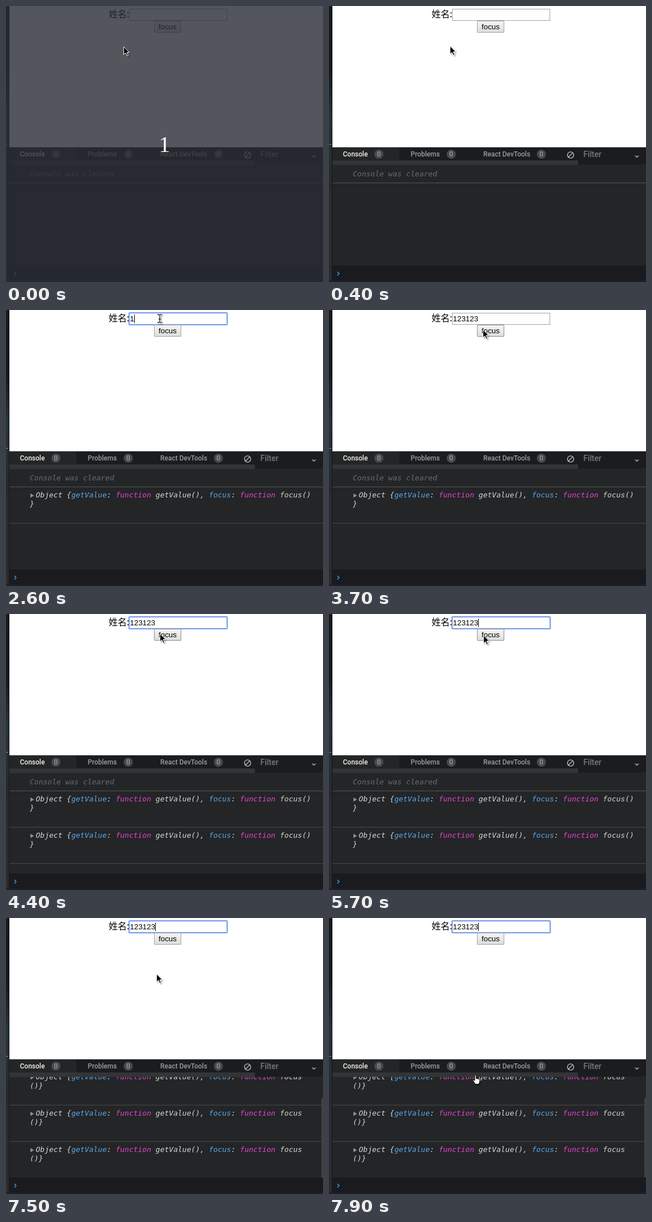
An HTML page for the animation above (8 s loop, 559 px wide and 486 px high).

```html
<!DOCTYPE html>
<html lang="zh">
<head>
<meta charset="utf-8">
<title>Focus demo</title>
<style>
  html, body { margin: 0; width: 100%; height: 100%; overflow: hidden; background: #242526; }
  svg { display: block; width: 559px; height: 486px; }
  .label { font: 16px "Noto Sans CJK SC", "Noto Sans CJK JP", "Noto Sans CJK", sans-serif; }
  .form { font: 13.333px "Liberation Sans", Arial, sans-serif; }
  .tab { font: 500 12px Roboto, sans-serif; fill: #9b9c9e; }
  .filter { font: 500 14px Roboto, sans-serif; fill: #77787a; }
  .log { font: italic 13px "DejaVu Sans Mono", monospace; fill: #d6d6d6; white-space: pre; }
  .key { fill: #56a8ee; }
  .word { fill: #e445d3; }
  .count { font: 40px "Liberation Serif", serif; fill: #fff; }
  .crisp { shape-rendering: crispEdges; }
</style>
</head>
<body>
<svg viewBox="0 0 559 486">
  <defs>
    <linearGradient id="face" x2="0" y2="1">
      <stop stop-color="#f5f5f5"/><stop offset="1" stop-color="#dcdcdc"/>
    </linearGradient>
    <linearGradient id="edge" x2="0" y2="1">
      <stop stop-color="#171a1d"/><stop offset=".35" stop-color="#15191c"/>
      <stop offset=".6" stop-color="#263338"/><stop offset="1" stop-color="#24292d"/>
    </linearGradient>
    <filter id="shadow" x="-50%" y="-50%" width="220%" height="220%">
      <feDropShadow dx="1.5" dy="1.5" stdDeviation="1" flood-opacity=".4"/>
    </filter>
    <clipPath id="view"><path d="M6 280H559V457H6z"/></clipPath>
  </defs>

  <g class="crisp">
    <path fill="#242526" d="M0 0H559V486H0z"/>
    <path fill="url(#edge)" d="M0 0H5V323H0z"/>
    <path fill="#2a2b2e" d="M0 323H5V486H0z"/>
    <path fill="#14161a" d="M5 0H6V486H5z"/>
    <path fill="#8b9698" d="M0 243H4V244H0z"/>
    <path fill="#fff" d="M6 0H559V248H6z"/>
    <path fill="#c8c8c8" d="M6 248H559V249H6z"/>
    <path fill="#1b1c20" d="M6 249H559V279H6z"/>
    <path fill="#242526" d="M6 249H124V273H6z"/>
    <path fill="#333436" d="M6 272H439V280H6z"/>
  </g>

  <text class="label" x="181" y="20">姓名:</text>
  <rect class="crisp" x="217.5" y="5.5" width="172" height="20" fill="#fff" stroke="#a3a3a3"/>
  <rect id="ring" x="217" y="5" width="173" height="21" rx="1" fill="none" stroke="#7299e8" stroke-width="2"/>
  <text id="value" class="form" x="218.6" y="20"></text>
  <path id="caret" class="crisp" fill="#000" d="M0 8h1v15h-1z"/>
  <rect id="button" x="261.5" y="26.5" width="47" height="20" rx=".5" fill="url(#face)"/>
  <text class="form" x="285" y="41" text-anchor="middle">focus</text>

  <g id="tabs"></g>
  <g fill="none" stroke="#c4c5c6" stroke-width="1.3">
    <circle cx="426" cy="262.3" r="5.5"/>
    <path d="M422 266.3l8-8"/>
    <path d="M540 263.5l3 2.7 3-2.7"/>
  </g>
  <text class="filter" x="448.5" y="266">Filter</text>

  <g clip-path="url(#view)">
    <g id="log">
      <text class="log" x="42" y="300" style="fill:#6b6c6e">Console was cleared</text>
      <path class="crisp" fill="#535456" d="M6 311H559V312H6z"/>
      <g id="rows"></g>
    </g>
    <path id="thumb" class="crisp" fill="#404143" d="M556 317H559V457H556z"/>
  </g>
  <path class="crisp" fill="#1a1b1f" d="M6 457H559V486H6z"/>
  <path class="crisp" fill="#1e1f28" d="M0 483H559V486H0z"/>
  <path fill="none" stroke="#4a9de8" stroke-width="1.4" d="M14.8 468l3 3.2-3 3.2"/>

  <g id="countdown">
    <path fill="#282c34" fill-opacity=".8" d="M0 0H559V486H0z"/>
    <text class="count" x="279.5" y="257" text-anchor="middle">1</text>
  </g>

  <g id="cursor" filter="url(#shadow)" stroke-linejoin="round">
    <path id="arrow" stroke="#fff" d="M.6.8V14.6l3.2-2.9 2.5 5.2 2.2-1-2.4-5.1h4.4z"/>
    <g id="beam" fill="none">
      <path stroke="#fff" stroke-width="3" d="M-4-7h2.5L0-6l1.5-1H4M-4 7h2.5L0 6l1.5 1H4M0-6V6M-2 1h4"/>
      <path stroke="#222" stroke-width="1.3" d="M-4-7h2.5L0-6l1.5-1H4M-4 7h2.5L0 6l1.5 1H4M0-6V6M-2 1h4"/>
    </g>
    <path id="hand" fill="#fff" stroke="#111" d="M-1 0.5q1.3-1.5 2.4 0V5.5l5.2 1q1.5.4 1.4 2.2l-.8 4.3-1.2 2.5H.2L-4 9.5q-.6-1.8 1-1.6l2 1.6z"/>
  </g>
</svg>

<script>
const LOOP = 8000;
const $ = id => document.getElementById(id);
const show = (id, on) => $(id).style.display = on ? "" : "none";
const last = (list, t) => list.findLast(step => step[0] <= t);

// time, x, y, shape
const cursorSteps = [
  [0, 207, 71], [400, 213, 70], [500, 234, 62], [600, 253, 52], [700, 265, 43], [800, 268, 37],
  [1000, 269, 27], [1100, 270, 18, "beam"], [1200, 270, 28], [1300, 270, 34],
  [1700, 270, 28], [1800, 271, 13, "beam"], [1900, 271, 15, "beam"],
  [3300, 271, 20, "beam"], [3400, 271, 30], [3500, 271, 34],
  [5700, 272, 37], [5800, 266, 50], [6400, 263, 56], [6500, 261, 62], [6600, 260, 65],
  [6800, 263, 52], [6900, 267, 23, "beam"], [7000, 268, 34],
  [7400, 267, 52], [7500, 265, 98], [7600, 262, 160], [7700, 260, 218],
  [7800, 258, 262, "hand"], [7900, 258, 277, "hand"]
];
const valueSteps = [[0, ""], [2600, "1"], [2900, "123"], [3100, "1231"], [3200, "123123"]];
const focusSteps = [[0, false], [1500, true], [3700, false], [3800, true], [6400, false], [7300, true]];
const caretSteps = [[0, true], [2200, false], [2600, true], [4400, false], [5000, true], [5800, false], [6200, true]];
const rowSteps = [[0, 0], [1500, 1], [3800, 2], [7300, 3]];

$("tabs").innerHTML = [["Console", 24.5, 88], ["Problems", 144, 215.5], ["React DevTools", 272, 374.5]]
  .map(([name, x, badge], i) => `
    <text class="tab" x="${x}" y="265" ${i ? "" : 'style="fill:#f2f2f2"'}>${name}</text>
    <circle cx="${badge}" cy="261" r="8" fill="#48494b"/>
    <text class="tab" x="${badge}" y="265" text-anchor="middle">0</text>`).join("");

const method = name =>
  `<tspan class="key">${name}</tspan>: <tspan class="word">function</tspan> ${name}`;

function logRow(index, narrow) {
  const y = 312 + index * 64;
  const [head, tail] = narrow ? ["", "()}"] : ["()", "}"];
  return `<path fill="#8c8d8f" d="M43 ${y + 11}l6.5 3.7-6.5 3.7z"/>
    <text class="log" x="52.5" y="${y + 18}">Object {${method("getValue")}(), ${method("focus")}${head}</text>
    <text class="log" x="42" y="${y + 34}">${tail}</text>
    <path class="crisp" fill="#48494b" d="M6 ${y + 63}H559v1H6z"/>`;
}

let shownRows = -1;
function showRows(count) {
  if (count === shownRows) return;
  shownRows = count;
  const scrolled = count > 2;
  $("rows").innerHTML = Array.from({ length: count }, (_, i) => logRow(i, scrolled)).join("");
  $("log").setAttribute("transform", `translate(0 ${scrolled ? -46 : 0})`);
  show("thumb", scrolled);
}

function draw(now) {
  const t = now % LOOP;
  const [, x, y, shape = "arrow"] = last(cursorSteps, t);
  const value = last(valueSteps, t)[1];
  const focused = last(focusSteps, t)[1];
  const hover = x >= 261 && x < 309 && y >= 26 && y < 47;

  show("countdown", t < 400);
  $("cursor").setAttribute("transform", `translate(${x} ${y})`);
  for (const id of ["arrow", "beam", "hand"]) show(id, id === shape);

  $("value").textContent = value;
  show("ring", focused);
  show("caret", focused && last(caretSteps, t)[1]);
  $("caret").setAttribute("transform", `translate(${Math.floor(219 + value.length * 7.415)} 0)`);
  $("button").setAttribute("stroke", hover ? "#8f8f8f" : "#a3a3a3");
  showRows(last(rowSteps, t)[1]);
  requestAnimationFrame(() => draw(performance.now() - start));
}

const start = performance.now();
draw(0);
</script>
</body>
</html>
```
